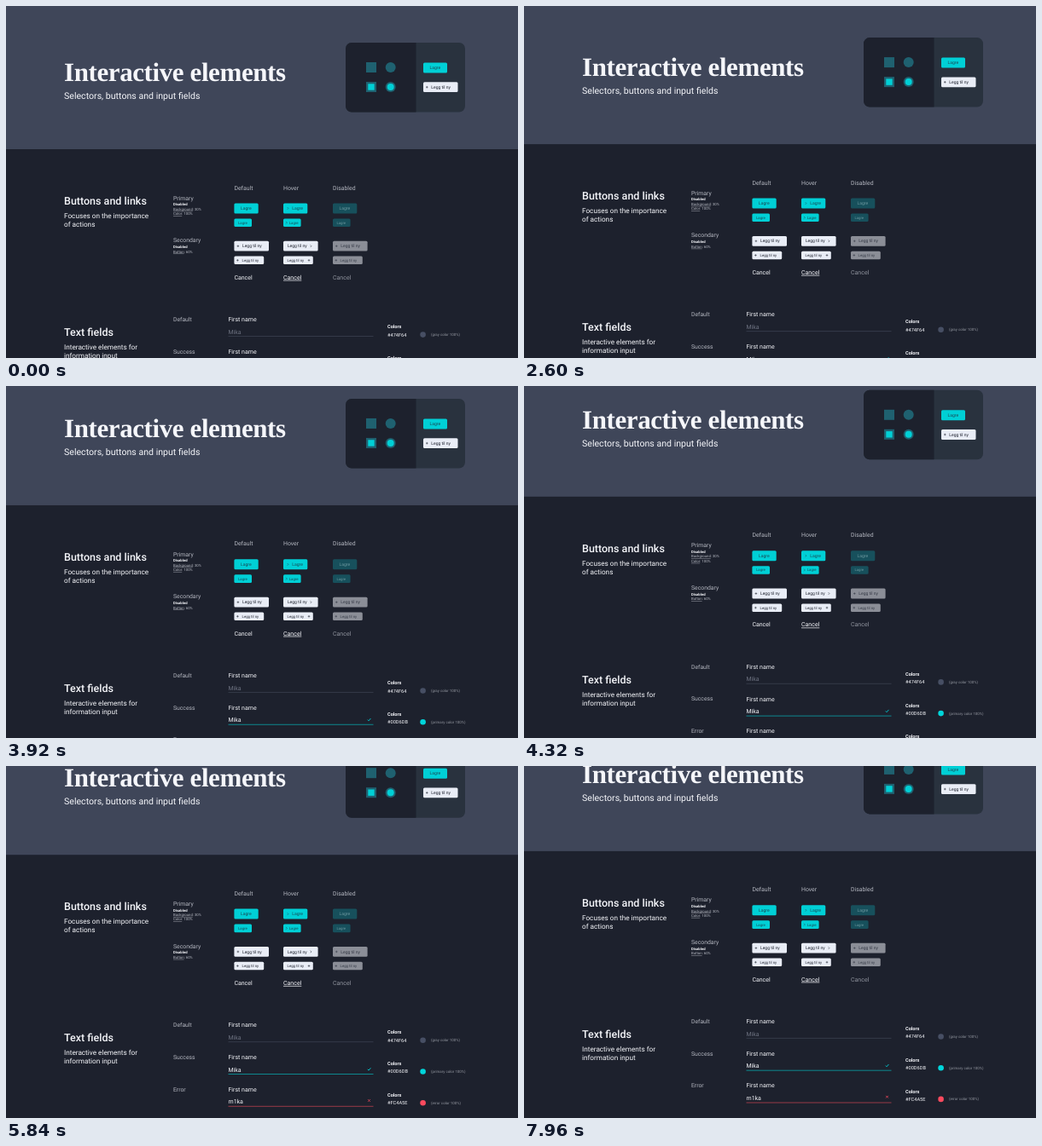
These frames come from a looping animation (600 by 413 pixels, 8000 ms). An HTML page:

```html
<!DOCTYPE html>
<html lang="en">
<head>
<meta charset="utf-8">
<title>Interactive elements</title>
<style>
  html, body { margin: 0; width: 100%; height: 100%; overflow: hidden; background: #1d212d; }
  svg { display: block; width: 100vw; height: 100vh; }
  text { font-family: Roboto, sans-serif; white-space: pre; text-rendering: geometricPrecision; }
  .title { font: bold 31px "Liberation Serif", serif; letter-spacing: -.4px; }
</style>
</head>
<body>
<svg viewBox="0 0 600 413"><g id="page"></g></svg>
<script>
const page = document.getElementById('page');
const WHITE = '#f5f6fa', LABEL = '#b4b7c0', DARK = '#1d212d';
const CYAN = '#00d0d6', TEAL = '#1f6170', PALE = '#e9edf6', RED = '#fc4a5e';

function add(tag, attrs, content = '') {
  const node = document.createElementNS('http://www.w3.org/2000/svg', tag);
  for (const key in attrs) node.setAttribute(key, attrs[key]);
  node.innerHTML = content;
  page.append(node);
}
const text = (x, y, size, fill, content, weight = 400) =>
  add('text', { x, y, 'font-size': size, fill, 'font-weight': weight }, content);
const rect = (x, y, width, height, fill, rx = 0) => add('rect', { x, y, width, height, fill, rx });
const circle = (cx, cy, r, fill) => add('circle', { cx, cy, r, fill });
const stroke = (d, color, width) =>
  add('path', { d, stroke: color, 'stroke-width': width, fill: 'none' });
const underlined = s => `<tspan text-decoration="underline">${s}</tspan>`;

const plus = (x, y, color) => stroke(`M${x - 1.3} ${y}h2.6M${x} ${y - 1.3}v2.6`, color, .55);
const chevron = (x, y, color) => stroke(`M${x - .6} ${y - 1.3}l1.2 1.3l-1.2 1.3`, color, .55);

function button(x, y, w, h, fill, color, label, textX, size, icon, iconX) {
  rect(x, y, w, h, fill, 1.5);
  text(textX, y + h / 2 + size * .34, size, color, label);
  if (icon) icon(iconX, y + h / 2, color);
}

function header() {
  rect(0, -10, 600, 178, '#3f4659');
  add('text', { x: 68, y: 88, class: 'title', fill: WHITE }, 'Interactive elements');
  text(68, 109.2, 10.6, WHITE, 'Selectors, buttons and input fields');

  rect(398, 43, 140, 81.5, '#29323e', 7);
  add('path', { d: 'M480.5 43H405a7 7 0 0 0-7 7v67.5a7 7 0 0 0 7 7h75.5z', fill: DARK });
  rect(422, 66, 12, 12, TEAL);
  circle(450.7, 72, 6, TEAL);
  rect(422, 89, 12, 12, TEAL);
  rect(424.3, 91.3, 7.4, 7.4, CYAN);
  circle(450.7, 95, 6, TEAL);
  circle(450.7, 95, 4, CYAN);
  button(489, 66.5, 28, 12, CYAN, '#1b4b58', 'Lagre', 496.5, 5.1);
  button(489, 89.3, 40.5, 11.8, PALE, DARK, 'Legg til ny', 498.3, 5, plus, 493.3);
}

function buttonSection() {
  text(68, 233, 12.5, WHITE, 'Buttons and links', 500);
  text(68, 249.3, 8.2, WHITE, 'Focuses on the importance');
  text(68, 259, 8.2, WHITE, 'of actions');

  text(196, 227.6, 6.85, LABEL, 'Primary');
  text(196, 234.4, 4.25, WHITE, 'Disabled', 700);
  text(196, 239.7, 4.3, LABEL, underlined('Background') + ': 30%');
  text(196, 245, 4.3, LABEL, underlined('Color') + ': 100%');
  text(196, 277.4, 6.85, LABEL, 'Secondary');
  text(196, 284.2, 4.25, WHITE, 'Disabled', 700);
  text(196, 289.6, 4.3, LABEL, underlined('Button') + ': 60%');

  const columns = [
    { x: 267.4, name: 'Default', fill: CYAN, ink: '#174c58', pale: PALE, paleInk: DARK,
      link: WHITE, cancel: 'Cancel', textX: [7.6, 4.6, 9.6, 9.2], icons: [, , plus, plus], iconX: [0, 0, 4.5, 4] },
    { x: 325, name: 'Hover', fill: CYAN, ink: '#174c58', pale: PALE, paleInk: DARK,
      link: WHITE, cancel: underlined('Cancel'), textX: [10.2, 6.8, 4.9, 4.6],
      icons: [chevron, chevron, chevron, plus], iconX: [5.3, 3.7, 32.3, 30] },
    { x: 383, name: 'Disabled', fill: '#17505c', ink: '#6b979e', pale: '#8b8e97', paleInk: '#353a46',
      link: '#8f939d', cancel: 'Cancel', textX: [7.4, 4.4, 9.3, 8.6], icons: [, , plus, plus], iconX: [0, 0, 4.3, 3.8] }
  ];
  // y, width, height, font size
  const rows = [[231.4, 28.3, 12, 5.1], [249.4, 20.6, 9.6, 4.3], [275.8, 40.6, 11.8, 5], [293.6, 34.8, 9.5, 4.3]];
  for (const c of columns) {
    text(c.x, 215.5, 6.9, LABEL, c.name);
    rows.forEach(([y, w, h, size], i) => {
      const primary = i < 2;
      button(c.x, y, w, h, primary ? c.fill : c.pale, primary ? c.ink : c.paleInk,
        primary ? 'Lagre' : 'Legg til ny', c.x + c.textX[i], size, c.icons[i], c.x + c.iconX[i]);
    });
    text(c.x, 320.7, 7, c.link, c.cancel);
  }
}

function fieldSection() {
  text(68, 387, 12.5, WHITE, 'Text fields', 500);
  text(68, 403.2, 8.2, WHITE, 'Interactive elements for');
  text(68, 412.8, 8.2, WHITE, 'information input');

  const fields = [
    ['Default', 'Mika', '#6d7280', '#3a4050', '#474F64', 'gray', '#474f64'],
    ['Success', 'Mika', WHITE, '#0aa3a8', '#00D6DB', 'primary', '#00d6db'],
    ['Error', 'm1ka', WHITE, '#b8404f', '#FC4A5E', 'error', RED]
  ];
  fields.forEach(([name, value, ink, line, hex, colorName, swatch], i) => {
    const y = i * 37.8, colorY = i * 36.7;
    text(196, y + 369.9, 6.8, LABEL, name);
    text(260.5, y + 370, 7, WHITE, 'First name');
    text(260.5, y + 384.7, 7, ink, value);
    stroke(`M260.5 ${y + 387.5}h170`, line, .8);
    text(447, colorY + 378.3, 5.6, WHITE, 'Colors', 700);
    text(447, colorY + 387.6, 5.65, WHITE, hex);
    circle(488.6, colorY + 385.6, 3.3, swatch);
    text(498, colorY + 387.2, 4.4, '#92969f', `(${colorName} color 100%)`);
  });
  stroke('M423.8 419.6l1.2 1.3l2.4-2.8', CYAN, .9);
  stroke('M424.2 455l2.6 2.6m0-2.6l-2.6 2.6', RED, .8);
}

header();
buttonSection();
fieldSection();

// Scroll position: [ms, px], joined by a monotone cubic.
const LOOP = 8000, STEP = 40;
const keys = [[0, 0], [1800, 0], [2400, 4.6], [2600, 5.9], [3440, 17.5], [4320, 38.2], [4880, 52.7],
  [5080, 56.6], [5840, 63.8], [6440, 67.3], [6600, 67.7], [7400, 67.7], [7960, 68.1], [8000, 68.1]];
const slope = i => (keys[i + 1][1] - keys[i][1]) / (keys[i + 1][0] - keys[i][0]);
const tangents = keys.map((_, i) => {
  if (i === 0 || i === keys.length - 1) return 0;
  const a = slope(i - 1), b = slope(i);
  return a * b > 0 ? 2 * a * b / (a + b) : 0;
});

function scrollAt(t) {
  const i = keys.findIndex((key, k) => k && t <= key[0]) - 1;
  const [t0, y0] = keys[i], [t1, y1] = keys[i + 1];
  const span = t1 - t0, u = (t - t0) / span, v = 1 - u;
  return y0 * v * v * (1 + 2 * u) + y1 * u * u * (3 - 2 * u)
    + span * u * v * (tangents[i] * v - tangents[i + 1] * u);
}

const start = performance.now();
function draw() {
  const t = Math.max(0, performance.now() - start) % LOOP;
  const y = scrollAt(Math.floor(t / STEP) * STEP);
  page.setAttribute('transform', `translate(0 ${-y.toFixed(2)})`);
  requestAnimationFrame(draw);
}
draw();
</script>
</body>
</html>
```
